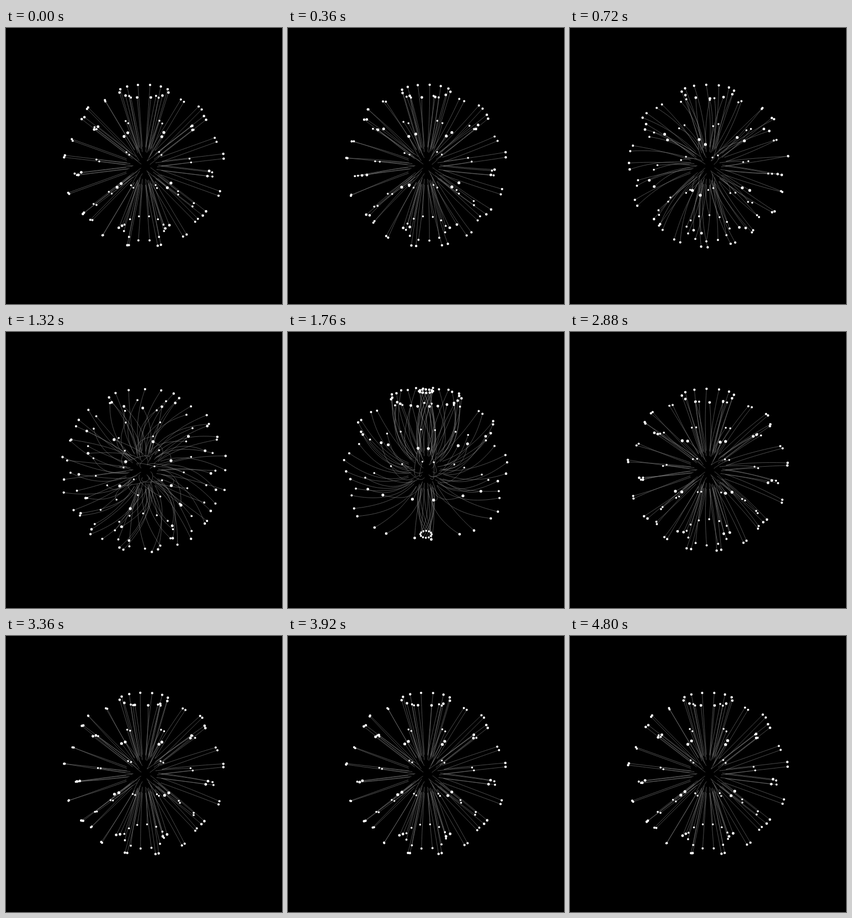
An HTML page with a canvas that plays this animation: 500 by 500 pixels, repeating every 4.84 s.

```html
<!DOCTYPE html>
<html lang="en">
<head>
<meta charset="utf-8">
<title>Swirling burst</title>
<style>
html, body { margin: 0; width: 100%; height: 100%; overflow: hidden; background: #000; }
canvas { display: block; width: 500px; height: 500px; }
</style>
</head>
<body>
<canvas id="stage" width="500" height="500"></canvas>
<script>
const ctx = document.getElementById('stage').getContext('2d');
const LOOP = 4840, STEP = 40;
const CORE = 36.2, LENGTH = 108.6;         // inner sphere radius, hair length
const DIST = 634, TILT = Math.atan(0.505); // camera
const CT = Math.cos(TILT), ST = Math.sin(TILT);
const RAD = Math.PI / 180, HALF = 15 * RAD;
const SEGMENTS = 18;

// Tips swirl in the plane of their face: distance and direction over time.
const TIMES = [0, 720, 1320, 1720, 2240, 2880, 3920, 4800, 4840];
const SWIRL = {
  upper: { size: [0, 27, 65, 66, 29, 8.6, 2.2, 0.4, 0], turn: [0, 33, 155, 235, 333, 484, 507, 510, 510] },
  lower: { size: [0, 17, 67, 68, 28, 8.7, 2.2, 0.4, 0], turn: [0, 9, 192, 280, 386, 532, 555, 560, 560] },
  cap:   { size: [0, 14, 42, 46, 28, 8.7, 2, 0.4, 0], turn: [0, 0, 180, 275, 386, 532, 555, 560, 560] }
};

function slope(v, i) {
  if (i === 0 || i === v.length - 1) return 0;
  return (v[i + 1] - v[i - 1]) / (TIMES[i + 1] - TIMES[i - 1]);
}

function curve(v, t) {
  let i = 0;
  while (i < TIMES.length - 2 && t >= TIMES[i + 1]) i++;
  const span = TIMES[i + 1] - TIMES[i], p = (t - TIMES[i]) / span, q = 1 - p;
  return v[i] * q * q * (1 + 2 * p) + v[i + 1] * p * p * (3 - 2 * p) +
    span * p * q * (slope(v, i) * q - slope(v, i + 1) * p);
}

// A face of a 12 x 6 sphere: corners are [latitude row, side of the cell].
function makeFace(row, kind, corners) {
  let out = 0, tang = 0, y = 0;
  for (const [lat, side] of corners) {
    const r = Math.sin(lat * 30 * RAD);
    out += r * Math.cos(HALF) / 3;
    tang += r * Math.sin(HALF) * side / 3;
    y += Math.cos(lat * 30 * RAD) / 3;
  }
  const a = row * 30 * RAD, b = a + 30 * RAD;
  const nr = Math.cos(a) - Math.cos(b);
  const ny = (Math.sin(b) - Math.sin(a)) * Math.cos(HALF);
  const len = Math.hypot(nr, ny);
  return {
    swirl: SWIRL[kind], flip: row === 5 ? -1 : 1,
    out: out * CORE, tang: tang * CORE, y: y * CORE, nr: nr / len, ny: ny / len
  };
}

const faces = [];
for (let row = 0; row < 6; row++) {
  if (row > 0) faces.push(makeFace(row, row === 5 ? 'cap' : 'upper', [[row, 1], [row, -1], [row + 1, 1]]));
  if (row < 5) faces.push(makeFace(row, row === 0 ? 'cap' : 'lower', [[row, -1], [row + 1, -1], [row + 1, 1]]));
}

function project(face, angle, s, side, down, sink) {
  const bend = s * s, reach = LENGTH * s - sink * bend;
  const out = face.out + face.nr * reach + face.ny * down * bend;
  const tang = face.tang + side * bend;
  const y = face.y + face.ny * reach - face.nr * down * bend;
  const sin = Math.sin(angle), cos = Math.cos(angle);
  const x = out * sin + tang * cos, z = out * cos - tang * sin;
  const scale = DIST / (DIST - y * ST - z * CT);
  return [250 + x * scale, 250 - (y * CT - z * ST) * scale, scale];
}

function draw(t) {
  const lines = new Path2D(), dots = new Path2D();
  for (const face of faces) {
    const size = curve(face.swirl.size, t), turn = curve(face.swirl.turn, t) * RAD;
    const side = size * Math.cos(turn) * face.flip;
    const down = size * Math.sin(turn) * face.flip;
    const sink = size * size / 350;
    for (let k = 0; k < 12; k++) {
      const angle = (15 + 30 * k) * RAD;
      let p;
      for (let i = 0; i <= SEGMENTS; i++) {
        p = project(face, angle, i / SEGMENTS, side, down, sink);
        if (i) lines.lineTo(p[0], p[1]);
        else lines.moveTo(p[0], p[1]);
      }
      const radius = 2.05 * p[2];
      dots.moveTo(p[0] + radius, p[1]);
      dots.arc(p[0], p[1], radius, 0, Math.PI * 2);
    }
  }
  ctx.fillStyle = '#000';
  ctx.fillRect(0, 0, 500, 500);
  ctx.lineWidth = 0.6;
  ctx.strokeStyle = '#808080';
  ctx.stroke(lines);
  ctx.fillStyle = '#fff';
  ctx.fill(dots);
}

const start = performance.now();
function tick() {
  const t = (performance.now() - start) % LOOP;
  draw(Math.floor(t / STEP) * STEP);
  requestAnimationFrame(tick);
}
tick();
</script>
</body>
</html>
```
